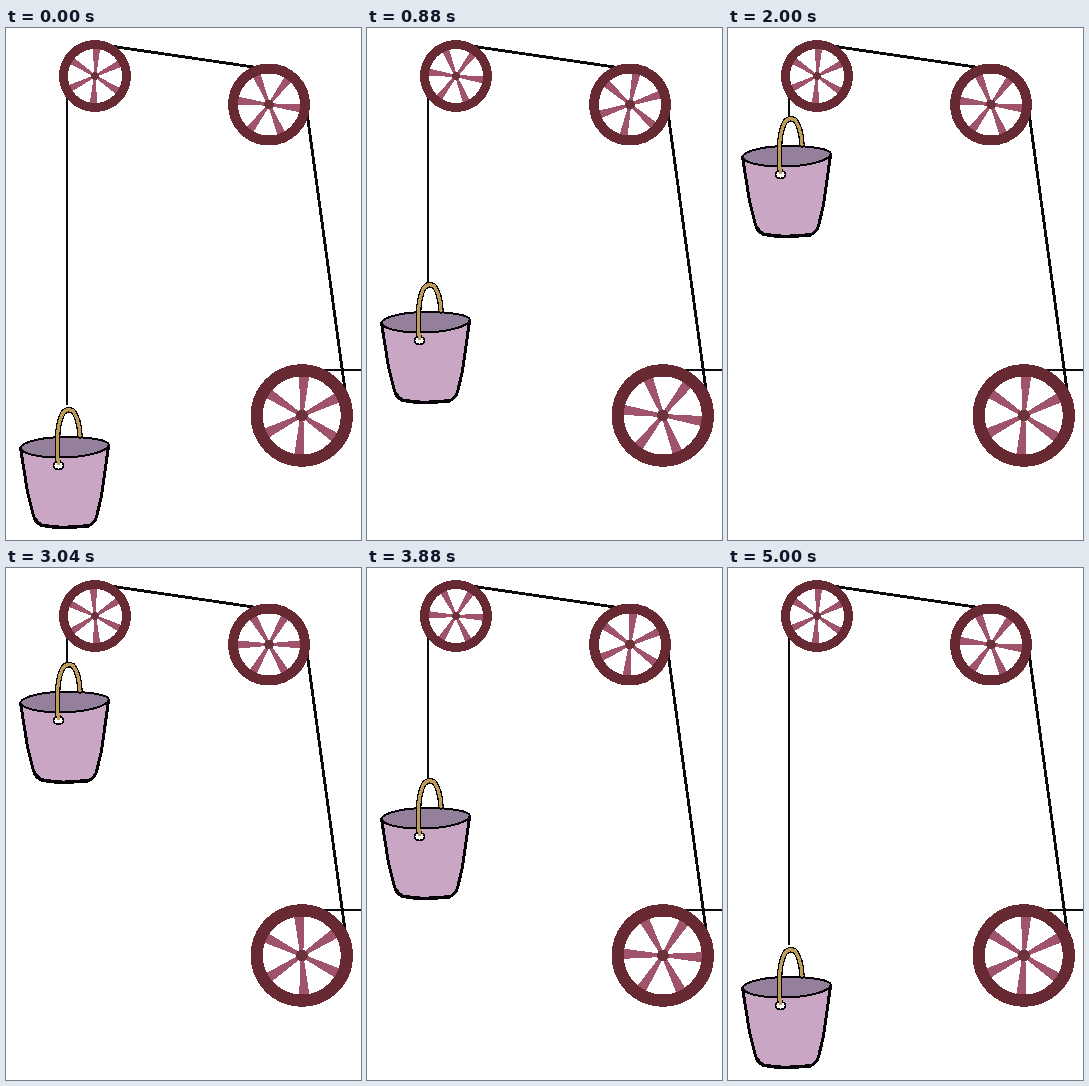
Recreate the animation shown at these times as an HTML page. Size 355 by 512 pixels, loop 6 s.

```html
<!DOCTYPE html>
<html lang="en">
<head>
<meta charset="utf-8">
<title>Bucket and pulleys</title>
<style>
  html, body { margin: 0; width: 100%; height: 100%; overflow: hidden; background: #fff; }
  svg { display: block; width: 100vw; height: 100vh; shape-rendering: crispEdges; }
  .rope { stroke: #0c090c; stroke-width: 2.9; fill: none; }
  .ink { stroke: #050305; stroke-linejoin: round; stroke-linecap: round; }
  .bail { fill: none; stroke-linecap: round; }
</style>
</head>
<body>
<svg viewBox="0 0 355 512">
  <path class="rope" d="M108 18.6L250 39.4M301.2 86L339 362"/>
  <path class="rope" d="M314 342H356" stroke-width="2.6"/>
  <line id="cord" x1="61" x2="61" y1="62" stroke="#0c0b12"/>
  <g id="wheels"></g>
  <g id="bucket">
    <path class="ink" fill="#c8a6c4" stroke-width="3" d="M14.5 420L21.5 464L27.5 488Q30 494 36 497Q46 499.5 57 499.8L82 498Q88 496 90.5 489L95.5 468L102.5 418Z"/>
    <path class="ink" fill="none" stroke-width="3.6" d="M29 491Q31 495 36 497.3Q46 499 57 499.6L82 498"/>
    <path class="ink" fill="#94809a" stroke-width="2" d="M14.3 419.5C18 413 38 409 60 409C84 409 102 412 102.8 416.5C102 424 78 429.5 54 429.5C32 429.5 15 425.5 14.3 419.5Z"/>
    <g class="bail">
      <path d="M51.8 434C50.5 412 51.5 394 57 385Q61 379.8 67 383Q73 390 74 408" stroke="#080503" stroke-width="5.6"/>
      <path d="M51.8 434C50.5 412 51.5 394 57 385Q61 379.8 67 383Q73 390 74 408" stroke="#bd9c5c" stroke-width="3.2"/>
    </g>
    <ellipse class="ink" cx="52.5" cy="437.6" rx="5" ry="3.8" fill="#fff" stroke-width="1.8"/>
    <path d="M52 430V437" stroke="#bd9c5c" stroke-width="3"/>
  </g>
</svg>
<script>
const TRAVEL = 291, STEP = 1000 / 24, LOOP = 6000;
// [step, distance below the top position]
const RISE = [[0, TRAVEL], [21, 166], [48, 0]];
const FALL = [[0, 0], [21, 122], [36, 215], [47, 278], [48, TRAVEL]];

const $ = id => document.getElementById(id);
const cord = $('cord'), bucket = $('bucket');

function addWheel(x, y, r, rim, hub, base) {
  const mid = r - rim / 2, inner = r - rim + 1, wide = r * 0.1, thin = r * 0.03;
  const spoke = `M${-thin} 0L${-wide} ${-inner}H${wide}L${thin} 0Z`;
  let spokes = '';
  for (let a = 0; a < 360; a += 60) spokes += `<path d="${spoke}" transform="rotate(${a})"/>`;
  $('wheels').insertAdjacentHTML('beforeend',
    `<g transform="translate(${x} ${y})">
      <circle r="${mid}" fill="#fff"/>
      <g class="spin" fill="#a0546c">${spokes}</g>
      <circle r="${mid}" fill="none" stroke="#672a33" stroke-width="${rim}"/>
      <circle r="${hub}" fill="#6c343a"/>
    </g>`);
  const el = $('wheels').lastElementChild.querySelector('.spin');
  return turn => el.setAttribute('transform', `rotate(${base + turn})`);
}

const wheels = [
  addWheel(89, 48, 36, 9, 4.2, 3.5),
  addWheel(263, 76.5, 41, 10, 4.8, -23),
  addWheel(295.8, 387.5, 51.2, 12.2, 6, 3.5)
];

function along(track, s) {
  const k = track.findIndex(p => p[0] >= s);
  if (k < 1) return track[0][1];
  const [s0, v0] = track[k - 1], [s1, v1] = track[k];
  return v0 + (v1 - v0) * (s - s0) / (s1 - s0);
}

function draw(ms) {
  const t = ms % LOOP, falling = t >= 3000;
  const step = Math.min(48, Math.floor((t % 3000 + 4.9) / STEP));
  const drop = along(falling ? FALL : RISE, step);
  const lift = TRAVEL - drop;
  bucket.setAttribute('transform', `translate(0 ${-lift})`);
  cord.setAttribute('y2', Math.min(377, 382 - lift));
  cord.setAttribute('stroke-width', 1.5 + 1.3 * drop / TRAVEL);
  wheels.forEach(spin => spin(360 * lift / TRAVEL));
}

const start = performance.now();
function tick() {
  draw(performance.now() - start);
  requestAnimationFrame(tick);
}
tick();
</script>
</body>
</html>
```
